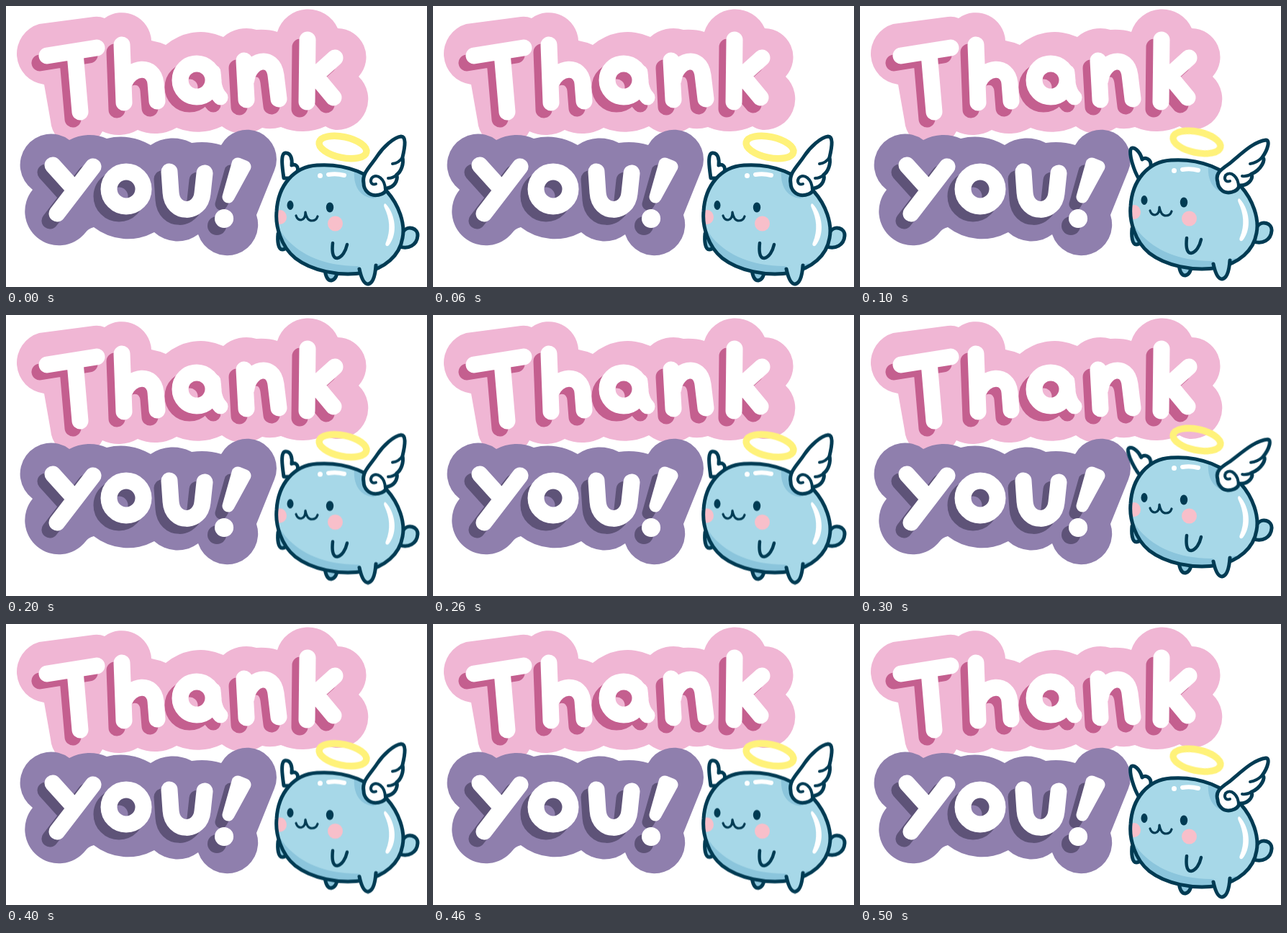
Animation, 585 px wide and 390 px high, one loop 600 ms. Source, as an HTML page:

```html
<!DOCTYPE html>
<html lang="en">
<head>
<meta charset="utf-8">
<title>Thank you!</title>
<style>
  html, body { margin: 0; width: 100%; height: 100%; overflow: hidden; background: #fff; }
  svg { display: block; width: 100vw; height: 100vh; }
  .letters { fill: none; stroke-width: 23; stroke-linecap: round; stroke-linejoin: round; }
  .ink { stroke: #003b53; stroke-width: 5; stroke-linecap: round; stroke-linejoin: round; }
  .line { fill: none; }
  .skin { fill: #a7d8e8; }
  .shade { fill: #8bc5dc; }
  .white { fill: #fff; }
  .shine { fill: none; stroke: #fff; stroke-width: 6; stroke-linecap: round; }
  .dark { fill: #003b53; }
  .cheek { fill: #f8bfca; }
</style>
</head>
<body>
<svg viewBox="0 0 585 390" role="img" aria-label="Thank you!">
  <defs>
    <g id="thank">
      <path d="M57 69L126 58M96 66L103 147"/>
      <path d="M161 54L164 134M164 107C173 84 205 80 208 107L210 132"/>
      <circle cx="265" cy="103" r="23"/>
      <path d="M288 92C288 108 290 119 298 127" stroke-width="21"/>
      <path d="M331 76L334 130M334 102C338 74 371 66 375 96L379 129"/>
      <path d="M419 47L418 133M457 72L427 99M430 97L455 127"/>
    </g>
    <g id="you">
      <path d="M65 221L93 252M121 223L71 288"/>
      <circle cx="167" cy="254" r="24"/>
      <path d="M227 230L229 259C231 290 270 290 273 260L276 232"/>
      <path d="M322 219L332 223L309 265Z" stroke-width="17"/>
      <path d="M303 295h.1" stroke-width="26"/>
    </g>
    <path id="body" d="M432 221C474 218 508 234 529 257C546 276 555 302 551 322C547 347 526 364 498 370C462 376 424 367 402 350C382 334 374 305 376 285C378 249 400 223 432 221Z"/>
    <clipPath id="inside"><use href="#body"/></clipPath>
  </defs>

  <path fill="#f0b6d4" d="M53 109A43 43 0 0 1 46 25L122 15Q130 14 137 17A41 41 0 0 1 202 48Q213 50 222 54A75 75 0 0 1 302 43A49 49 0 0 1 348 33Q365 32 377 36A45 45 0 0 1 461 31A40 40 0 0 1 490 98A43 43 0 0 1 458 172Q450 171 444 167A77 77 0 0 1 382 168Q368 172 356 169A48 48 0 0 1 300 167A77 77 0 0 1 237 169A60 60 0 0 1 183 172A53 53 0 0 1 134 174A38 38 0 0 1 62 160Z"/>
  <use class="letters" href="#thank" stroke="#c45f8f" x="-10" y="10"/>
  <use class="letters" href="#thank" stroke="#fff"/>

  <path fill="#8f7fad" d="M37 255A42 42 0 0 1 88 186A59 59 0 0 1 140 184A80 80 0 0 1 201 193A55 55 0 0 1 258 190Q280 187 299 193A41 41 0 0 1 373 228L348 290A42 42 0 0 1 267 317A48 48 0 0 1 206 314A77 77 0 0 1 122 307Q114 309 110 315A46 46 0 0 1 37 255Z"/>
  <use class="letters" href="#you" stroke="#5e5378" x="-10" y="10"/>
  <use class="letters" href="#you" stroke="#fff"/>

  <g id="critter">
    <path class="ink skin" d="M552 313C558 304 573 308 572 319C571 332 559 338 547 334Z"/>
    <path class="ink shade" d="M378 316C377 326 378 338 384 338C389 338 391 334 393 328Z"/>
    <path class="ink shade" d="M443 365C444 376 447 381 452 381C457 380 459 376 461 368Z"/>

    <g class="ink white up">
      <path d="M386 239C384 225 381 205 388 204C396 203 398 213 397 221C402 219 407 222 405 230L400 239Z"/>
    </g>
    <g class="ink white out" id="leftOut">
      <path d="M387 246C381 236 374 215 376 206C379 200 389 208 392 220C397 216 405 220 404 229L400 242Z"/>
    </g>

    <use href="#body" class="skin"/>
    <g clip-path="url(#inside)">
      <path class="shade" d="M370 290C384 328 415 350 455 358C480 362 500 362 522 357V380H370Z"/>
      <path class="shade" d="M484 226C482 250 491 265 511 267L532 250L510 230Z"/>
      <ellipse class="cheek" cx="381" cy="293" rx="9" ry="10"/>
    </g>
    <use href="#body" class="ink line"/>

    <path class="shine" d="M448 234Q459 232 470 235"/>
    <circle class="white" cx="436.500" cy="235.500" r="3.500"/>
    <path class="white" d="M528 275C541 289 545 316 532 332C529 335 526 332 528 328C535 311 533 295 526 280C524 276 526 273 528 275Z"/>

    <circle class="cheek" cx="457.500" cy="302" r="10.500"/>
    <ellipse class="dark" cx="395" cy="276.500" rx="4.500" ry="6.500"/>
    <ellipse class="dark" cx="450" cy="279.500" rx="5.200" ry="7"/>
    <path class="ink line" style="stroke-width:3.200" d="M403 291Q405 297 410 297Q416 296 416 286Q418 298 425 298Q431 298 433 292"/>

    <path class="ink skin" style="stroke:none" d="M454 329C453 338 453 350 460 350C467 349 472 340 474 331"/>
    <path class="ink line" style="stroke-width:4.500" d="M454 329C453 338 453 350 460 350C467 349 472 340 474 331"/>
    <path class="skin" d="M490 361L491 366C494 379 498 386 503 386C510 385 513 374 514 358Z"/>
    <path class="ink line" d="M491 365C494 379 498 386 503 386C510 385 513 374 514 360"/>

    <g class="up">
      <path class="ink white" d="M497 246C494 232 507 222 516 208C524 196 539 182 549 181C556 181 555 193 551 210C553 219 549 230 543 234C545 244 538 252 529 253C527 263 510 266 502 258C498 254 497 250 497 246Z"/>
      <path class="ink line" style="stroke-width:4" d="M551 210Q546 218 537 219M543 234Q538 239 531 239M527 255C527 240 515 231 508 239C505 245 509 249 514 247"/>
    </g>
    <g class="out" id="rightOut">
      <path class="ink white" d="M497 251C493 239 503 233 513 226C527 215 546 195 564 193C570 193 567 206 559 217C565 219 557 235 544 240C547 248 538 257 527 256C525 266 509 269 502 262C498 258 497 255 497 251Z"/>
      <path class="ink line" style="stroke-width:4" d="M559 217Q551 225 542 226M544 240Q538 244 531 243M526 258C526 244 515 235 508 242C505 248 509 252 514 250"/>
    </g>

    <ellipse cx="468" cy="196" rx="33.500" ry="14.500" transform="rotate(12 468 196)" fill="none" stroke="#fff27a" stroke-width="9.500"/>
  </g>
</svg>
<script>
  const $ = id => document.getElementById(id);
  const loop = { duration: 600, iterations: Infinity };

  // Each value holds for one sixth of the loop.
  function play(el, prop, values) {
    const frames = values.map((v, i) => ({ [prop]: v, offset: i / values.length, easing: 'step-end' }));
    frames.push({ [prop]: values[0], offset: 1 });
    el.animate(frames, loop).startTime = 0;
  }

  const rise = [0, 7, 14.5, 23, 14.5, 7];
  play($('critter'), 'transform', rise.map(y => `translateY(${-y}px)`));

  const flap = [0, 1, 0, 1, 0, 1];
  const show = on => on ? 'visible' : 'hidden';
  document.querySelectorAll('.up').forEach(el => play(el, 'visibility', flap.map(f => show(!f))));
  document.querySelectorAll('.out').forEach(el => play(el, 'visibility', flap.map(f => show(f))));

  // Wings open a little wider at the top of the hop.
  function spread(el, pivot, angle) {
    el.style.transformOrigin = pivot;
    play(el, 'transform', rise.map(y => `rotate(${y === 23 ? angle : 0}deg)`));
  }
  spread($('leftOut'), '395px 228px', -10);
  spread($('rightOut'), '505px 250px', 2.5);
</script>
</body>
</html>
```
